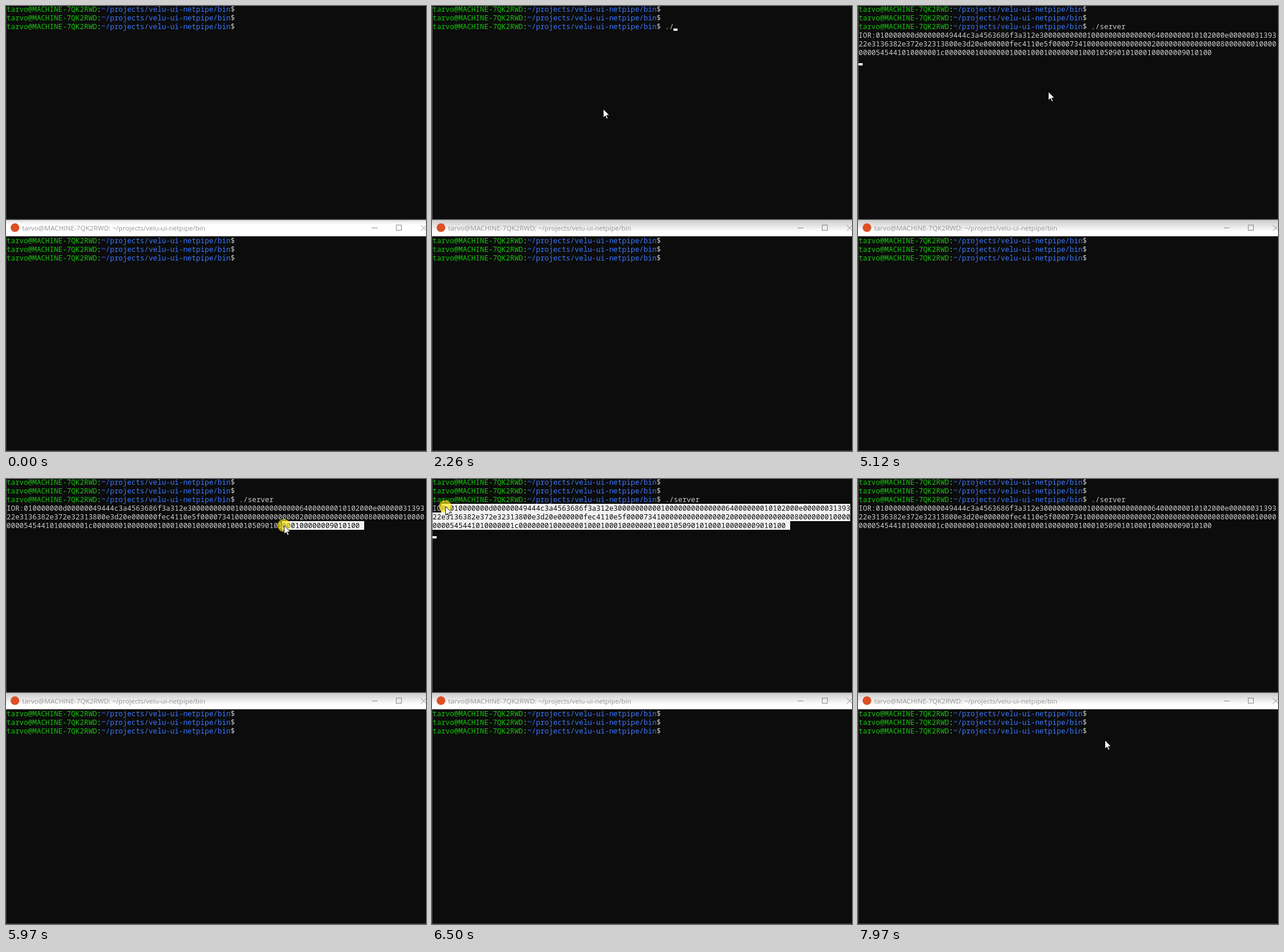
Recreate the animation shown at these times as an HTML page with a canvas. Size 727x771 px, loop 8000 ms.

```html
<!DOCTYPE html>
<html>
<head>
<meta charset="utf-8">
<style>
html, body { margin: 0; width: 100%; height: 100%; overflow: hidden; background: #0c0c0c; }
canvas { display: block; }
</style>
</head>
<body>
<canvas id="stage" width="727" height="771"></canvas>
<script>
let ctx = document.getElementById('stage').getContext('2d');
let LOOP = 8000, CELL = 7.455, ROW = 15, TOP = -2, BOTTOM = 399;
let BG = '#0c0c0c', GREY = '#cccccc', GREEN = '#16c60c', BLUE = '#3b78ff';
let USER = 'tarvo@MACHINE-7QK2RWD', PATH = '~/projects/velu-ui-netpipe/bin';
let REFERENCE = [
  'IOR:010000000d00000049444c3a4563686f3a312e3000000000010000000000000064000000010102000e00000031393',
  '22e3136382e372e32313800e3d20e000000fec4110e5f0000734100000000000000020000000000000008000000010000',
  '0000545441010000001c00000001000000010001000100000001000105090101000100000009010100 '
];
let KEYS = [[2030, '.'], [2260, '/'], [2870, 's'], [3100, 'e'], [3330, 'r'], [3650, 'ver ']];

// Pointer path as time, x, y; it advances in steps within each range
let TRACK = [
  [230, 492, 582], [460, 296, 178], [5119, 296, 178], [5120, 329, 148],
  [5660, 613, 80], [5810, 613, 80], [5970, 474, 80], [6500, 18, 47],
  [6580, 0, 47], [6890, 0, 47], [7660, 113, 246], [7970, 427, 452]
];
let RANGES = [[230, 460], [5120, 5660], [5810, 6580], [6890, 7970]];

let cellX = col => 1 + col * CELL;

function rect(x, y, w, h, color) {
  ctx.fillStyle = color;
  ctx.fillRect(x, y, w, h);
}

function print(text, col, top, color) {
  ctx.font = '12.4px "Noto Sans Mono", "DejaVu Sans Mono", monospace';
  ctx.fillStyle = color;
  [...text].forEach((c, i) => ctx.fillText(c, cellX(col + i), top + 12));
}

function prompts(top) {
  for (let i = 0; i < 3; i++) {
    let y = top + i * ROW, path = USER.length + 1;
    print(USER, 0, y, GREEN);
    print(':', path - 1, y, GREY);
    print(PATH, path, y, BLUE);
    print('$', path + PATH.length, y, GREY);
  }
}

function titleBar(focusAbove) {
  rect(0, 371, 727, 28, '#ffffff');
  let depth = focusAbove ? 20 : 8;
  let shade = ctx.createLinearGradient(0, 371, 0, 371 + depth);
  shade.addColorStop(0, focusAbove ? 'rgba(0,0,0,.2)' : 'rgba(0,0,0,.12)');
  shade.addColorStop(1, 'rgba(0,0,0,0)');
  rect(0, 371, 727, depth, shade);
  rect(0, 369, 727, 1, '#3c3c3c');
  rect(0, 370, 727, 1, focusAbove ? '#8c8c8c' : '#777777');

  ctx.fillStyle = '#dd4f24';
  ctx.beginPath();
  ctx.arc(15.5, 384, 7.5, 0, 7);
  ctx.fill();
  ctx.font = '11.6px "Open Sans", "Noto Sans", sans-serif';
  ctx.fillStyle = '#949494';
  ctx.fillText(USER + ': ' + PATH, 28, 389);

  ctx.strokeStyle = '#888888';
  ctx.lineWidth = 1;
  ctx.strokeRect(675.5, 379.5, 9, 9);
  ctx.beginPath();
  ctx.moveTo(633, 384.5); ctx.lineTo(643, 384.5);
  ctx.moveTo(718, 379.5); ctx.lineTo(728, 389.5);
  ctx.moveTo(728, 379.5); ctx.lineTo(718, 389.5);
  ctx.stroke();
}

function pointerAt(t) {
  let range = RANGES.filter(r => r[0] <= t).pop();
  if (!range) return null;
  let [start, end] = range;
  let time = t >= end ? end : start + Math.floor((t - start) / 76) * 76;
  let next = TRACK.findIndex(k => k[0] >= time);
  let b = TRACK[next], a = TRACK[Math.max(0, next - 1)];
  let f = b === a ? 0 : (time - a[0]) / (b[0] - a[0]);
  return { x: a[1] + (b[1] - a[1]) * f, y: a[2] + (b[2] - a[2]) * f };
}

function output(t, pointer) {
  let selecting = t >= 5810 && t < 6890;
  let startRow = selecting ? Math.floor((pointer.y - TOP) / ROW) - 3 : 9;
  let startCol = selecting ? Math.max(0, Math.floor((pointer.x - 1) / CELL)) : 0;
  REFERENCE.forEach((line, i) => {
    let top = TOP + (i + 3) * ROW;
    let from = i < startRow ? line.length : i === startRow ? startCol : 0;
    let x = Math.round(cellX(from));
    print(line.slice(0, from), 0, top, GREY);
    if (from < line.length) {
      rect(x, top, Math.round(cellX(line.length)) - x, ROW, '#f2f2f2');
      print(line.slice(from), from, top, BG);
    }
  });
}

function caret(t, typed) {
  let visible = t >= 780 && t < 1330 || t >= 1860 && t < 5650 ||
    t >= 6180 && t < 6890 || t >= 7240 && t < 7660;
  if (!visible) return;
  let col = t < 4430 ? 54 + typed.length : 0;
  let row = t < 4430 ? 2 : t < 4510 ? 3 : 6;
  rect(Math.round(cellX(col)), TOP + row * ROW + 11, 7, 4, '#ffffff');
}

function clickGlow(t) {
  if (t >= 780 && t < 1080) return t < 930 ? 1 : t < 1005 ? 0.66 : 0.33;
  if (t >= 5810 && t < 6660) return t < 6580 ? 1 : 0.5;
  return 0;
}

function drawPointer({ x, y }, glow) {
  ctx.save();
  ctx.translate(Math.round(x), Math.round(y));
  if (glow) {
    ctx.fillStyle = `rgba(255,232,20,${0.66 * glow})`;
    ctx.beginPath();
    ctx.arc(0, 0.5, 11, 0, 7);
    ctx.fill();
  }
  let arrow = new Path2D('M.5 .5V15.5L4 12.2L6.4 17.4L8.6 16.4L6.3 11.3H11Z');
  ctx.fillStyle = '#ffffff';
  ctx.fill(arrow);
  ctx.strokeStyle = '#000000';
  ctx.lineWidth = 0.9;
  ctx.stroke(arrow);
  ctx.restore();
}

function draw(t) {
  let focused = t >= 780;
  let typed = KEYS.filter(k => k[0] <= t).map(k => k[1]).join('');
  let pointer = pointerAt(t);
  rect(0, 0, 727, 771, BG);
  prompts(TOP);
  print(typed, 54, TOP + 2 * ROW, GREY);
  if (t >= 4510) output(t, pointer);
  caret(t, typed);
  titleBar(focused);
  prompts(BOTTOM);
  rect(0, 0, 1, 370, focused ? '#555555' : '#3c3c3c');
  rect(0, 399, 1, 372, '#3c3c3c');
  rect(0, 770, 727, 1, '#3c3c3c');
  if (pointer) drawPointer(pointer, clickGlow(t));
}

let begin = performance.now();
function tick() {
  draw((performance.now() - begin) % LOOP);
  requestAnimationFrame(tick);
}
tick();
</script>
</body>
</html>
```
